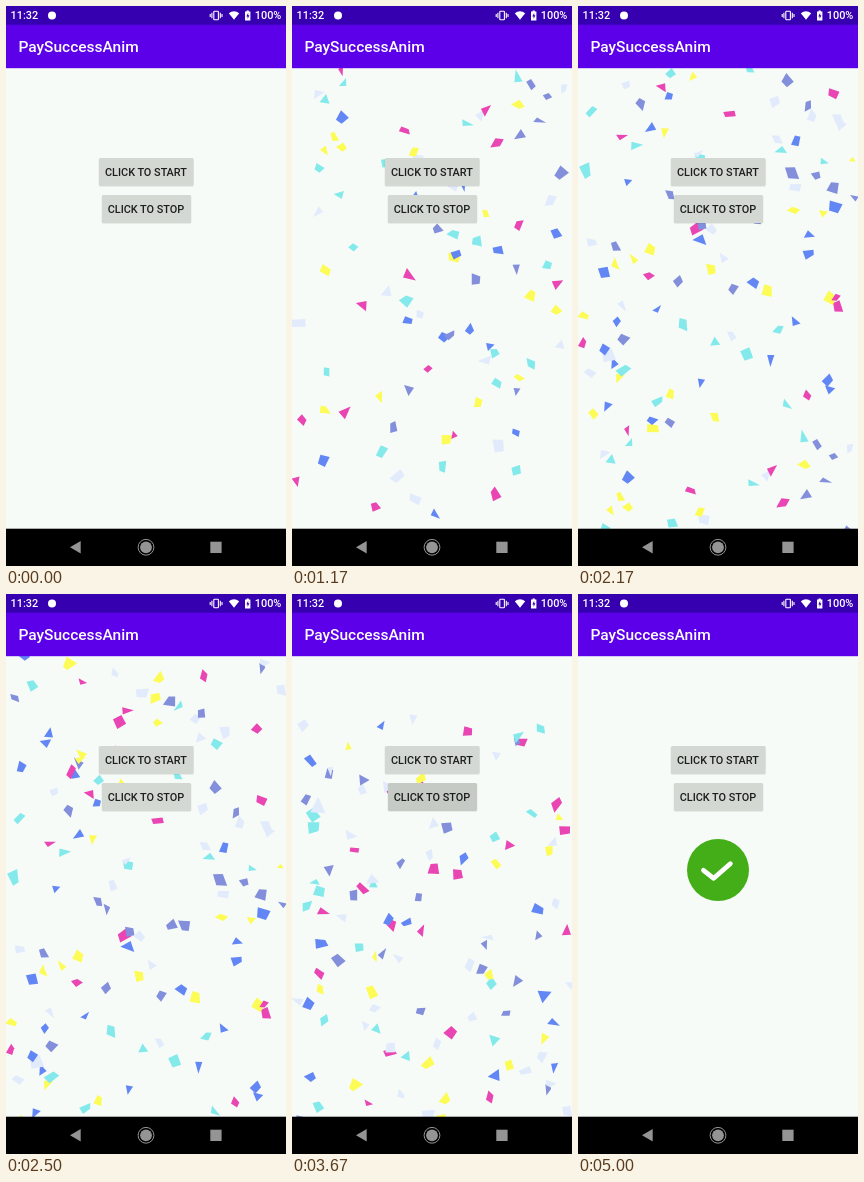
Write an HTML page with a canvas that moves like this. It is 280 px wide and 560 px high and loops after 5170 ms.

```html
<!DOCTYPE html>
<html lang="en">
<head>
<meta charset="utf-8">
<title>PaySuccessAnim</title>
<style>
html, body { margin: 0; width: 100%; height: 100%; overflow: hidden; background: #f6fbf8; }
canvas, svg { position: absolute; left: 0; top: 0; width: 280px; height: 560px; display: block; }
text { font: 500 10.9px Roboto, sans-serif; fill: #fff; }
.title { font-size: 15.5px; }
.label { font-size: 10.89px; fill: #1c1e1c; text-anchor: middle; }
.button { fill: #d3d8d3; }
.button.pressed { fill: #c5cac5; }
</style>
</head>
<body>
<canvas id="confetti" width="280" height="560"></canvas>
<svg viewBox="0 0 280 560">
  <!-- status bar and toolbar -->
  <rect width="280" height="62.2" fill="#5c00e9"/>
  <rect width="280" height="18.7" fill="#3600b0"/>
  <text x="4.5" y="13.3">11:32</text>
  <circle cx="46" cy="9.5" r="4" fill="#fff"/>
  <g fill="none" stroke="#fff" stroke-width="1.1">
    <rect x="207.8" y="5.2" width="4.6" height="8.6" rx=".6"/>
    <path d="M205.9 6.7v5.6M204.2 8v3M214.3 6.7v5.6M216 8v3"/>
  </g>
  <path d="M222.8 7.3Q228 3.4 233.2 7.3L228 13.7Z" fill="#fff"/>
  <path d="M239 5.6h1.6v-1h2.2v1h1.6v8.8H239Z" fill="#fff"/>
  <path d="M242.2 6.8l-1.9 3.6h1.3v2.6l1.8-3.7h-1.2Z" fill="#3600b0"/>
  <text x="248.8" y="13.3">100%</text>
  <text class="title" x="12.4" y="46.4">PaySuccessAnim</text>

  <!-- buttons -->
  <g fill="#000" fill-opacity=".06">
    <rect x="92.4" y="152" width="95.7" height="29" rx="2"/>
    <rect x="95.4" y="189" width="90.2" height="29" rx="2"/>
  </g>
  <rect class="button" x="93" y="152" width="94.5" height="28" rx="1.5"/>
  <rect class="button" id="stop" x="96" y="189" width="89" height="28" rx="1.5"/>
  <text class="label" x="140" y="169.8">CLICK TO START</text>
  <text class="label" x="140" y="207">CLICK TO STOP</text>

  <g id="done" visibility="hidden">
    <circle r="31" fill="#43ae17"/>
    <path d="M-14.5 .3L-4.3 8.3L12.3-6.3" fill="none" stroke="#fff" stroke-width="4.8" stroke-linecap="round" stroke-linejoin="round"/>
  </g>

  <!-- navigation bar -->
  <rect y="522.7" width="280" height="37.3"/>
  <g fill="#949494">
    <path d="M64 541.3L74.7 535v12.6Z"/>
    <circle cx="140" cy="541.3" r="5.9"/>
    <circle cx="140" cy="541.3" r="7.9" fill="none" stroke="#949494"/>
    <rect x="204.3" y="535.7" width="11.3" height="11.3"/>
  </g>
</svg>
<script>
const LOOP = 5170, FPS = 6;
const START = -90, STOP = 3495, COUNT = 330;
const TOP = 62, BOTTOM = 523, SPEED = 0.36; // px per ms
const COLORS = ['#e945b3', '#fdfb55', '#6287f5', '#838fdb', '#83e9ea', '#e2ebfc'];

const ctx = document.getElementById('confetti').getContext('2d');
const stopButton = document.getElementById('stop');
const done = document.getElementById('done');

function seeded(seed) {
  return () => {
    seed = (seed + 0x6D2B79F5) | 0;
    let n = Math.imul(seed ^ (seed >>> 15), 1 | seed);
    n = (n + Math.imul(n ^ (n >>> 7), 61 | n)) ^ n;
    return ((n ^ (n >>> 14)) >>> 0) / 4294967296;
  };
}

const random = seeded(1132);
const between = (a, b) => a + (b - a) * random();

// Irregular triangle or quad, flattened and turned at random
function shard() {
  const corners = random() < 0.35 ? 3 : 4;
  const size = random() < 0.03 ? 10.5 : between(6, 8.2);
  const squash = between(0.6, 1);
  const turn = between(0, Math.PI * 2);
  const cos = Math.cos(turn), sin = Math.sin(turn);
  const start = between(0, Math.PI * 2);
  return Array.from({ length: corners }, (_, i) => {
    const angle = start + (i + between(-0.25, 0.25)) / corners * Math.PI * 2;
    const radius = size * between(0.75, 1.1);
    const x = Math.cos(angle) * radius, y = Math.sin(angle) * radius * squash;
    return [x * cos - y * sin, x * sin + y * cos];
  });
}

// The shower thickens gently after its start
const pieces = Array.from({ length: COUNT }, (_, i) => ({
  born: START + (STOP - START) * ((i + random()) / COUNT) ** 0.83,
  x: between(2, 278),
  color: COLORS[Math.floor(random() * COLORS.length)],
  points: shard()
}));

// Every piece falls straight down at one speed, without turning
function drawPiece({ born, x, color, points }, t) {
  const y = TOP + SPEED * (t - born);
  if (t < born || y > BOTTOM + 12) return;
  ctx.beginPath();
  points.forEach(([dx, dy]) => ctx.lineTo(x + dx, y + dy));
  ctx.fillStyle = color;
  ctx.fill();
}

// The picture advances in sixths of a second, rounded to 10 ms
const stepStart = k => Math.round(k * 100 / FPS) * 10;

function stepTime(t) {
  let k = Math.floor(t * FPS / 1000) + 1;
  while (stepStart(k) > t) k--;
  return stepStart(k);
}

function render(t) {
  ctx.clearRect(0, 0, 280, 560);
  if (t > 0) pieces.forEach(p => drawPiece(p, t));
  stopButton.classList.toggle('pressed', t >= 3500 && t < 3830);
  const grow = Math.min(1, Math.max(0, (t - 4740) / 260));
  const scale = 1 - (1 - grow) ** 2;
  done.setAttribute('visibility', grow ? 'visible' : 'hidden');
  done.setAttribute('transform', `translate(140 276) scale(${scale})`);
}

const origin = performance.now();
let shown = -1;

function tick() {
  const t = stepTime((performance.now() - origin) % LOOP);
  if (t !== shown) render(shown = t);
  requestAnimationFrame(tick);
}
tick();
</script>
</body>
</html>
```
